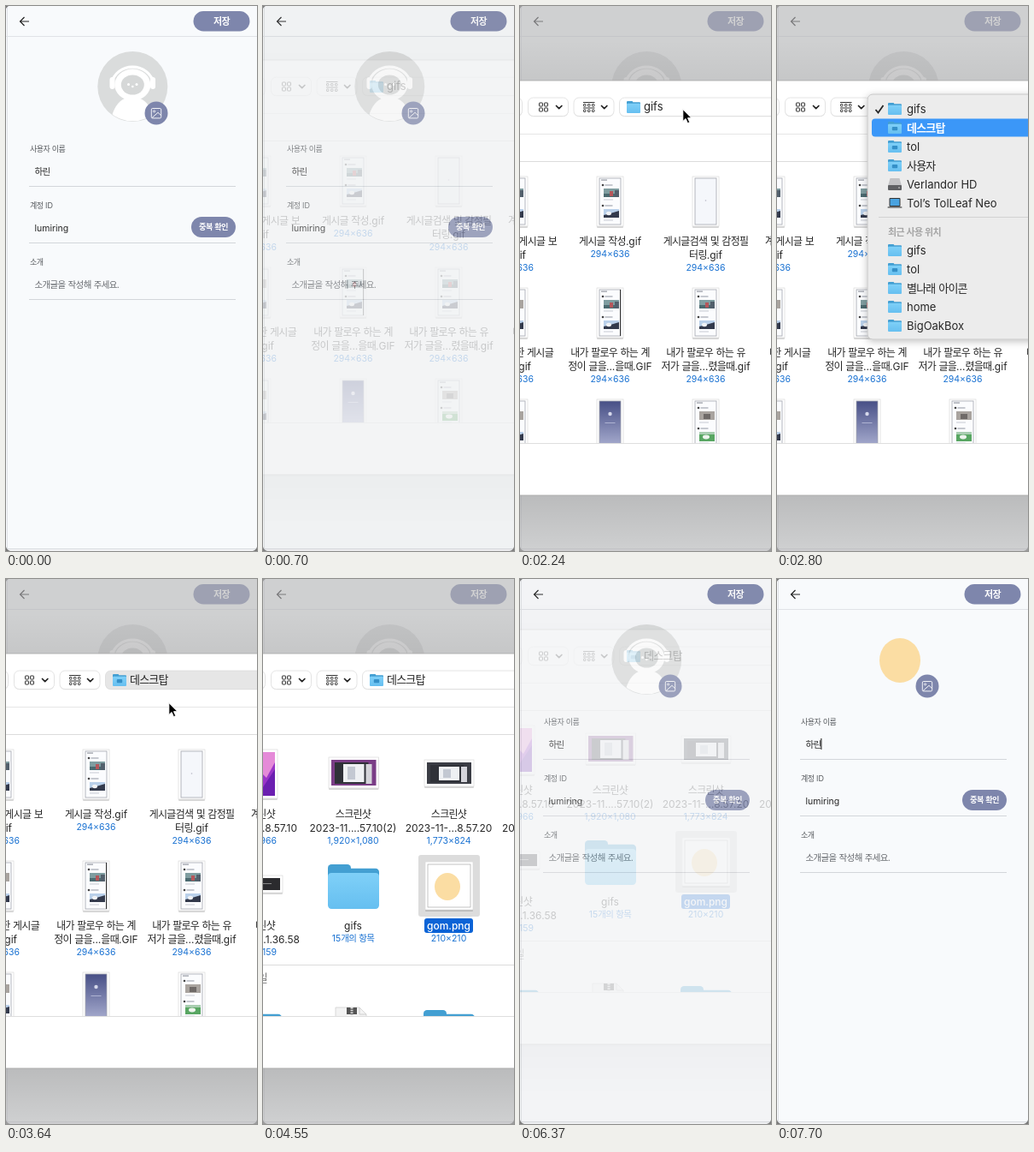
Write an HTML page that moves like this. It is 294x636 px and loops after 8000 ms.

```html
<!DOCTYPE html>
<html lang="ko">
<head>
<meta charset="utf-8">
<title>Profile edit</title>
<style>
html, body { margin: 0; width: 100%; height: 100%; overflow: hidden; background: #f8fafc; }
svg { display: block; width: 100vw; height: 100vh; }
text { font-family: Inter, "Noto Sans CJK KR", "Noto Sans CJK", sans-serif; white-space: pre; }
.ko { letter-spacing: -.06em; }
</style>
</head>
<body>
<svg id="stage" viewBox="0 0 294 636" xmlns="http://www.w3.org/2000/svg"></svg>
<script>
const LOOP = 8000, STEP = 70;
const ACCENT = '#7e86ac', BLUE = '#1a72d2', INK = '#262626';

// --- drawing helpers ---
const rect = (x, y, w, h, fill, more = '') =>
  `<rect x="${x}" y="${y}" width="${w}" height="${h}" fill="${fill}" ${more}/>`;
const path = (d, stroke, width = 1, more = 'fill="none"') =>
  `<path d="${d}" stroke="${stroke}" stroke-width="${width}" ${more}/>`;
const shape = (d, fill) => path(d, 'none', 0, `fill="${fill}"`);
const hline = (x1, x2, y, color) => path(`M${x1} ${y}H${x2}`, color);
const ellipse = (x, y, rx, ry, fill, more = '') =>
  `<ellipse cx="${x}" cy="${y}" rx="${rx}" ry="${ry}" fill="${fill}" ${more}/>`;
const group = (id, body) => `<g id="${id}">${body}</g>`;
const text = (x, y, str, size, fill = INK, more = '') => {
  const runs = str.replace(/[가-힣]+/g, s => `<tspan class="ko">${s}</tspan>`);
  return `<text x="${x}" y="${y}" font-size="${size}" fill="${fill}" ${more}>${runs}</text>`;
};
const MID = 'text-anchor="middle"', END = 'text-anchor="end"';
const BOLD = ' font-weight="600"', MEDIUM = ' font-weight="500"';

function folder(x, y, w, h, mark = false) {
  const r = w * .07;
  return rect(x, y, w * .45, h * .4, '#439fd2', `rx="${r}"`) +
    rect(x, y + h * .09, w, h * .6, '#439fd2', `rx="${r}"`) +
    rect(x, y + h * .19, w, h * .81, 'url(#folderFront)', `rx="${r}"`) +
    (mark ? rect(x + w * .3, y + h * .42, w * .4, h * .32, '#3590c8', 'rx="1"') : '');
}

function paper(x, y, w, h) {
  return rect(x, y + 1, w, h + 1, '#000', 'opacity=".16" rx="1"') +
    rect(x, y, w, h, '#fff', 'stroke="#d9d9d9" stroke-width=".7"');
}

// --- profile form ---
function avatar() {
  return group('robot',
    ellipse(148.3, 94, 41, 41, '#dadcdc') +
    `<g clip-path="url(#avatarClip)">${shape('M122 140C124 118 134 106 148 106S173 118 175 140Z', '#fff')}</g>` +
    path('M124 90A24.5 22 0 0 1 172.5 90', '#fff', 3.2) +
    rect(121.5, 83, 6, 14, '#fff', 'rx="3"') + rect(169, 83, 6, 14, '#fff', 'rx="3"') +
    ellipse(148.3, 92, 21, 18.5, '#fff') + ellipse(148.3, 92, 13.5, 11.5, '#d6d8d8') +
    ellipse(143.5, 91.5, 1.5, 1.5, '#fff') + ellipse(153, 91.5, 1.5, 1.5, '#fff') +
    ellipse(148.3, 94, 1.3, 1.2, '#fff')) +
    group('picked', ellipse(144, 95, 24, 26, '#fbdda3'));
}

function form() {
  const field = (y, label, value, fill) =>
    text(28, y, label, 9, '#55585c') + text(33.5, y + 27, value, 10.5, fill) +
    hline(27, 269, y + 40.5, '#d3d6da');
  const pill = (x, y, w, h, label, size) =>
    rect(x, y, w, h, ACCENT, `rx="${h / 2}"`) +
    text(x + w / 2, y + h / 2 + size * .37, label, size, '#fff', MID + BOLD);
  return rect(0, 0, 294, 636, '#f8fafc') +
    hline(0, 294, 35.5, '#e0e3e7') + hline(0, 294, 633.5, '#dadde1') +
    rect(0, 634, 294, 2, '#f3f4f6') + path('M1.5 0V634', '#dfe2e6') +
    shape('M0 631V636H5Q1 635 0 631ZM294 631V636H289Q293 635 294 631ZM0 3V0H3Q1 1 0 3Z', '#777') +
    path('M27 18H16.7M21.5 13L16.5 18L21.5 23', '#222', 1.2) +
    pill(219.5, 6, 66, 23.5, '저장', 11) + avatar() +
    ellipse(176, 125, 13.5, 13.5, ACCENT) +
    rect(170.3, 119.5, 11.4, 11.4, 'none', 'rx="1.4" stroke="#fff" stroke-width=".9"') +
    ellipse(173.6, 122.9, 1.1, 1.1, 'none', 'stroke="#fff" stroke-width=".8"') +
    path('M171 130.5L178 124.3L181.5 127.6', '#fff', .9) +
    field(170, '사용자 이름', '하린', INK) +
    field(236, '계정 ID', 'lumiring', INK) +
    field(302, '소개', '소개글을 작성해 주세요.', '#66696e') +
    pill(217, 246, 52, 24, '중복 확인', 9.2) +
    group('caret', rect(51.3, 186, 1.1, 13, '#222'));
}

// --- file dialog ---
const screen = (cx, y, fill) =>
  paper(cx - 15.5, y, 31, 58) + rect(cx - 12.5, y + 2, 25, 54, fill, 'stroke="#a3a6ae" stroke-width=".8"');

const seaPhoto = (x, y) =>
  rect(x, y, 18, 10, '#7f9da0') + rect(x, y + 6, 18, 4, '#4b6a70') +
  rect(x + 7, y + 3, 4, 6, '#b5565a') + rect(x + 13, y + 2, 5, 8, '#53606c');
const skyPhoto = (x, y) =>
  rect(x, y, 18, 10, '#b9d0ea') + shape(`M${x} ${y + 10}V${y + 7}L${x + 8} ${y + 5}L${x + 18} ${y + 2}V${y + 10}Z`, '#333a4c') +
  ellipse(x + 6, y + 5, 3, 2.2, '#f1f3f6');
const fieldPhoto = (x, y) =>
  rect(x, y, 18, 11, '#58a662') + rect(x, y, 18, 3, '#a8cdb0') + ellipse(x + 8, y + 6, 4, 2.4, '#eef4ee');
const roomPhoto = (x, y) =>
  rect(x, y, 18, 10, '#a9a49f') + rect(x + 5, y + 3, 8, 6, '#6f6a68');

function feedThumb(cx, y, upper = seaPhoto, lower = skyPhoto) {
  const x = cx - 12.5, top = y + 2;
  let s = screen(cx, y, '#fbfcfe') + rect(x + 2, top + 1.5, 7, 1.2, '#9599a3');
  [6, 30].forEach(dy => {
    s += ellipse(x + 4, top + dy + 2, 1.3, 1.3, '#444') +
      rect(x + 6.5, top + dy + 1.4, 9, 1.2, '#a4a9b3') + rect(x + 5, top + dy + 18.5, 11, 1, '#c8ccd3');
  });
  return s + upper(x + 5, top + 12) + lower(x + 5, top + 36);
}

function splashThumb(cx, y) {
  return screen(cx, y, 'url(#splash)') +
    ellipse(cx, y + 17, 2.2, 2.2, '#d5d8ea') + rect(cx - 6, y + 27, 12, 1, '#aeb3d2');
}

// Lines of a file name, then its size, centred below the icon
function caption(cx, y, lines, size) {
  return lines.map((s, i) => text(cx, y + i * 16, s, 12, INK, MID)).join('') +
    text(cx, y + lines.length * 15 - (lines.length > 1 ? 0 : 1), size, 10.5, BLUE, MID);
}
const cutCaption = (y, parts) =>
  parts.map(([x, s], i) => text(x, y + [0, 16, 30][i], s, i < 2 ? 12 : 10.5, i < 2 ? INK : BLUE, END)).join('');

function gifList() {
  const dims = '294×636';
  return feedThumb(-6.5, 199) +
    cutCaption(279, [[43, '게시글 보'], [7, '기.gif'], [16, '636']]) +
    feedThumb(105.5, 199) + caption(105.5, 279, ['게시글 작성.gif'], dims) +
    screen(217.5, 199, '#f5f7fb') + ellipse(217.5, 227, .8, .8, '#b5b9c4') +
    caption(217.5, 279, ['게시글검색 및 감정필', '터링.gif'], dims) + text(287, 279, '계', 12) +
    feedThumb(-6.5, 329, roomPhoto) +
    cutCaption(409, [[39, '한 게시글'], [13, '글.gif'], [16, '636']]) +
    feedThumb(105.5, 329) + rect(117, 331, 1, 54, '#333') +
    caption(105.5, 409, ['내가 팔로우 하는 계', '정이 글을...을때.GIF'], dims) +
    feedThumb(217.5, 329) + caption(217.5, 409, ['내가 팔로우 하는 유', '저가 글을...렸을때.gif'], dims) +
    text(292, 409, '내', 12) +
    feedThumb(-6.5, 459, roomPhoto) + splashThumb(105.5, 459) + feedThumb(217.5, 459, roomPhoto, fieldPhoto);
}

function screenThumb(x, y, w, h, wall) {
  return paper(x, y, w, h) + rect(x + 3, y + 3, w - 6, h - 6, wall) +
    rect(x + 7, y + 6, w - 19, h - 11, '#2f3138') + rect(x + 17, y + 8, w - 34, h - 15, '#eef0f3') +
    rect(x + 22, y + 11, 9, h - 21, '#c3c8d2') + rect(x + w - 15, y + 8, 7, h - 13, '#d4d4da');
}

function desktopList() {
  return paper(-32, 199, 49, 57) + rect(-29, 202, 43, 51, '#9a35c8') +
    shape('M0 202H14V214L4 232L0 228Z', '#e58ad8') + shape('M0 243L14 222V253H0Z', '#6b1fb0') +
    cutCaption(279, [[14, '스크린샷'], [40, '2023-11-...8.57.10'], [16, '966']]) +
    screenThumb(77, 208, 58.5, 36, '#7a3d86') +
    caption(105.5, 279, ['스크린샷', '2023-11....57.10(2)'], '1,920×1,080') +
    screenThumb(189, 211, 58, 31, '#3b3d45') +
    caption(217.5, 279, ['스크린샷', '2023-11-...8.57.20'], '1,773×824') + text(280, 295, '20', 12) +
    paper(-36, 346, 59, 20) + rect(-33, 349, 53, 14, '#2b2b2e') + rect(0, 355, 10, 1, '#888') +
    cutCaption(409, [[14, '스크린샷'], [43, '2023-11-...1.36.58'], [16, '159']]) +
    folder(76, 333, 60, 52) + caption(105.5, 409, ['gifs'], '15개의 항목') +
    group('pickBox', rect(182, 322, 72, 72, '#dcdcdc', 'rx="3"')) +
    paper(190, 330, 56, 56) + rect(193, 333, 50, 50, '#fff', 'stroke="#aaa" stroke-width=".7"') +
    ellipse(216, 359, 15, 16, '#fbdda3') + caption(217.5, 409, ['gom.png'], '210×210') +
    group('pickName', rect(189, 396, 57, 17, '#0b63d6', 'rx="3"') +
      text(217.5, 409, 'gom.png', 12, '#fff', MID + MEDIUM)) +
    hline(0, 294, 450.5, '#dcdcdc') + text(5, 470, '파일', 13, '#777', END + MEDIUM) +
    folder(-38, 503, 60, 52) + folder(188, 503, 60, 52) +
    path('M85 520V500H113L121 508V520Z', '#d0d0d0', .8, 'fill="#f3f3f3"') +
    path('M113 500V508H121', '#c4c4c4', .8) +
    rect(98, 500, 12, 8, '#555') + path('M104 500V512', '#ddd', 3, 'stroke-dasharray="1.5 1.2"');
}

function toolbar() {
  const button = x => rect(x, 107.8, 47, 21.5, '#000', 'rx="6" opacity=".1"') +
    rect(x, 107, 47, 21.5, '#fff', 'rx="6" stroke="#dedede" stroke-width=".8"');
  const chevron = x => path(`M${x} 116.5L${x + 3.2} 119.7L${x + 6.4} 116.5`, '#222', 1.7,
    'fill="none" stroke-linecap="round" stroke-linejoin="round"');
  const box = (x, y, s) => rect(x, y, s, s, 'none', 'rx=".6" stroke="#333" stroke-width="1"');
  let icons = '';
  [22.5, 28.5].forEach(x => [113, 119].forEach(y => icons += box(x, y, 4)));
  [112.5, 119].forEach(y => {
    icons += path(`M74 ${y}H87.5`, '#333', 1);
    [74.5, 79.5, 84.5].forEach(x => icons += box(x, y + 2, 2.5));
  });
  return button(-44.5) + button(9.5) + button(63) + icons + chevron(42.5) + chevron(95.5) +
    rect(116.5, 107.8, 200, 21.5, '#000', 'rx="6" opacity=".1"') +
    rect(116.5, 107, 200, 21.5, '#fff', 'id="place" rx="6" stroke="#dedede" stroke-width=".8"') +
    group('placeGifs', folder(125, 111, 16, 14) + text(145, 122, 'gifs', 13)) +
    group('placeDesk', folder(125, 111, 16, 14, true) + text(145, 122, '데스크탑', 13));
}

function dialog() {
  return rect(0, 571, 294, 65, 'url(#shadeDown)') + rect(0, 40, 294, 47, 'url(#shadeUp)') +
    rect(-5, 87, 304, 484, '#fff', 'stroke="#a9a9a9" stroke-width=".8"') +
    toolbar() + hline(0, 294, 149.5, '#e6e6e6') + hline(0, 294, 181.5, '#dcdcdc') +
    `<g clip-path="url(#listClip)">${group('gifList', gifList())}${group('deskList', desktopList())}</g>` +
    hline(0, 294, 510.5, '#dedede');
}

// --- location menu ---
function menu() {
  const row = (y, label, icon, fill = INK, more = '') => icon(y) + text(152, y + 4.6, label, 13, fill, more);
  const plain = y => folder(130, y - 7, 16, 14);
  const marked = y => folder(130, y - 7, 16, 14, true);
  const drive = y => shape(`M132.5 ${y - 7}H143.5L146 ${y + 2}H130Z`, '#c2c2c4') +
    rect(130, y + 1, 16, 6, '#5f6063', 'rx="1"') + ellipse(143, y + 4, .8, .8, '#ddd');
  const laptop = y => rect(131.5, y - 6, 13, 10, '#333', 'rx="1"') +
    rect(132.5, y - 5, 11, 8, '#4aa3e0') + rect(129.5, y + 4, 17, 1.8, '#777', 'rx=".9"');
  const bar = y => rect(111, y + .5, 190, 21, '#3b97f8', 'rx="4"');
  const tick = c => path('M115.5 121L118.5 124.5L124.5 116', c, 1.8);
  return rect(106, 103, 200, 286, '#ececec', 'rx="6" stroke="#bdbdbd" stroke-width=".8" filter="url(#menuShadow)"') +
    tick(INK) + row(120, 'gifs', plain) + row(142, '데스크탑', marked) +
    row(164, 'tol', marked) + row(186, '사용자', marked) +
    row(208, 'Verlandor HD', drive) + row(230, 'Tol’s TolLeaf Neo', laptop) +
    hline(119, 294, 246.5, '#d2d2d2') + text(130, 268, '최근 사용 위치', 11, '#a6a6a6', 'font-weight="700"') +
    row(285, 'gifs', plain) + row(307, 'tol', marked) + row(329, '별나래 아이콘', plain) +
    row(351, 'home', plain) + row(373, 'BigOakBox', plain) +
    group('hoverGifs', bar(109) + tick('#fff') + row(120, 'gifs', plain, '#fff', MEDIUM)) +
    group('hoverDesk', bar(131) + row(142, '데스크탑', marked, '#fff', BOLD));
}

const gradient = (id, a, b, aOp = 1, bOp = 1) =>
  `<linearGradient id="${id}" x1="0" y1="0" x2="0" y2="1"><stop offset="0" stop-color="${a}" stop-opacity="${aOp}"/>` +
  `<stop offset="1" stop-color="${b}" stop-opacity="${bOp}"/></linearGradient>`;

document.getElementById('stage').innerHTML = '<defs>' +
  gradient('folderFront', '#7fd0f8', '#66bff0') + gradient('splash', '#474f86', '#a9aed0') +
  gradient('shadeDown', '#000', '#000', .1, 0) + gradient('shadeUp', '#000', '#000', 0, .045) +
  `<clipPath id="avatarClip">${ellipse(148.3, 94, 40.3, 40.3, '#fff')}</clipPath>` +
  `<clipPath id="listClip">${rect(0, 182, 294, 328, '#fff')}</clipPath>` +
  '<filter id="menuShadow" x="-10%" y="-10%" width="120%" height="120%">' +
  '<feDropShadow dx="0" dy="2" stdDeviation="4" flood-opacity=".25"/></filter></defs>' +
  form() + group('dim', rect(0, 0, 294, 636, '#b4b4b6')) +
  group('dialog', dialog()) + group('menu', menu()) +
  group('pointer', path('M0 0V14L3.3 11L5.6 16.2L8 15.2L5.7 10.2H10.2Z', '#fff', 1, 'fill="#000" stroke-linejoin="round"'));

// --- timeline ---
const el = id => document.getElementById(id);
const show = (id, on) => el(id).setAttribute('visibility', on ? 'inherit' : 'hidden');
const fade = (id, value) => {
  show(id, value > 0);
  el(id).setAttribute('opacity', value);
};
const within = (t, a, b) => t >= a && t < b;
// Value from a list that advances one entry per step and holds its last one
const stepped = (t, start, list) => list[Math.min(list.length - 1, Math.floor((t - start) / STEP))];

// Opacity, vertical shift and backdrop strength of the dialog
function sheetAt(t) {
  if (t < 700) return [0, 0, 0];
  if (t < 6160) return stepped(t, 700, [[.2, -24, .2], [.52, -13, .5], [.85, -4, .84], [1, 0, 1]]);
  return stepped(t, 6160, [[1, -1, .92], [.84, -7, .78], [.5, -18, .46], [.2, -28, .13], [.06, -33, .04], [0, -35, 0]]);
}

function draw(time) {
  const t = Math.floor((time % LOOP) / STEP) * STEP;
  const [alpha, shift, dim] = sheetAt(t);
  fade('dialog', alpha);
  el('dialog').setAttribute('transform', `translate(0 ${shift})`);
  fade('dim', dim * .6);

  const chosen = t >= 3570, loaded = t >= 3710, picked = t >= 4550, saved = t >= 6510;
  show('gifList', !loaded);
  show('deskList', loaded);
  show('pickBox', loaded && picked);
  show('pickName', loaded && picked);
  show('placeGifs', !chosen);
  show('placeDesk', chosen);
  el('place').setAttribute('fill', within(t, 2450, 3780) ? '#e6e6e6' : '#fff');

  fade('menu', within(t, 2450, 3430) ? 1 : within(t, 3430, 3570) ? stepped(t, 3430, [.65, .3]) : 0);
  show('hoverGifs', within(t, 2450, 2730));
  show('hoverDesk', within(t, 2730, 3290) || within(t, 3360, 3570));

  show('pointer', within(t, 2240, 2450) || within(t, 3570, 3780));
  el('pointer').setAttribute('transform', `translate(190.8 ${t < 2450 ? 120.5 : 144.5})`);

  show('robot', !saved);
  show('picked', saved);
  show('caret', t >= 7700);
}

let start;
function tick(now) {
  start ??= now;
  draw(now - start);
  requestAnimationFrame(tick);
}
draw(0);
requestAnimationFrame(tick);
</script>
</body>
</html>
```
